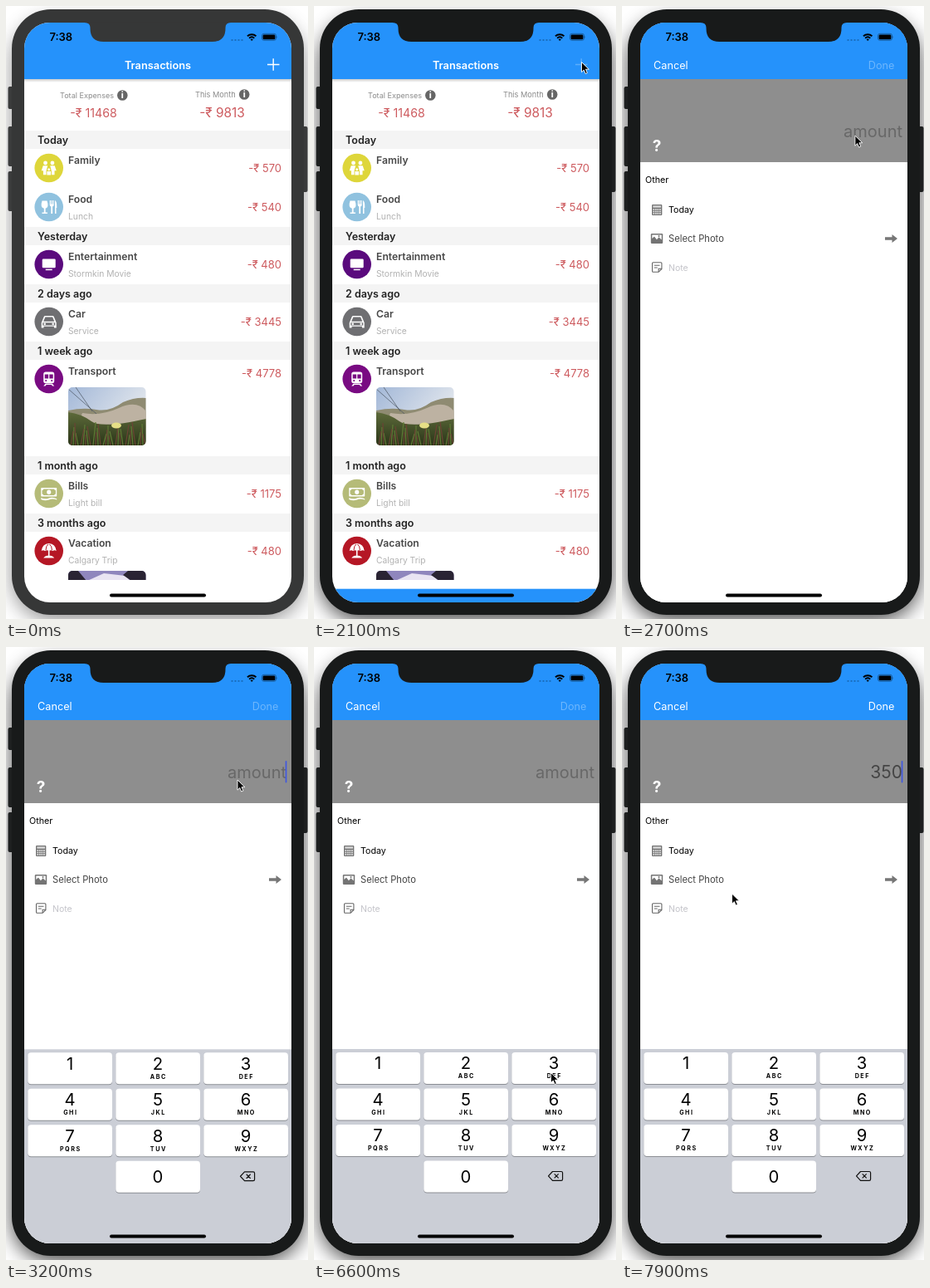
These frames come from a looping animation (364x738 px, 8 s). An HTML page:

```html
<!DOCTYPE html>
<html lang="en">
<head>
<meta charset="utf-8">
<title>Expense tracker</title>
<style>
  html, body { margin: 0; width: 100%; height: 100%; overflow: hidden; background: #fff; }
  svg { display: block; width: 364px; height: 738px; }
  text { font-family: Inter, Roboto, "Liberation Sans", sans-serif; }
</style>
</head>
<body>
<svg id="stage" viewBox="0 0 364 738" xmlns="http://www.w3.org/2000/svg">
  <defs>
    <clipPath id="screen"><rect x="22" y="20" width="322" height="698" rx="31"/></clipPath>
    <clipPath id="list"><rect x="22" y="88" width="322" height="603"/></clipPath>
    <clipPath id="dunes"><rect x="75" y="459" width="93.500" height="70" rx="5"/></clipPath>
    <clipPath id="dusk"><rect x="75" y="680" width="93.500" height="70" rx="5"/></clipPath>
    <filter id="soft" x="-30%" y="-30%" width="160%" height="160%"><feGaussianBlur stdDeviation="12"/></filter>
    <linearGradient id="sky" x2="1" y2=".6">
      <stop offset="0" stop-color="#a3b8d8"/><stop offset="1" stop-color="#eceef0"/>
    </linearGradient>
    <linearGradient id="grass" x2="0" y2="1">
      <stop offset="0" stop-color="#5d6a3a"/><stop offset="1" stop-color="#2a3518"/>
    </linearGradient>
    <linearGradient id="navShade" x2="0" y2="1">
      <stop offset="0" stop-color="#000" stop-opacity=".2"/><stop offset="1" stop-color="#000" stop-opacity="0"/>
    </linearGradient>
  </defs>

  <rect id="shadow" x="7" y="16" width="352" height="724" rx="50" filter="url(#soft)"/>
  <g id="buttons">
    <rect x="2.500" y="97" width="8" height="27" rx="2"/>
    <rect x="2.500" y="145" width="8" height="48" rx="2"/>
    <rect x="2.500" y="199" width="8" height="48" rx="2"/>
    <rect x="355.500" y="145" width="8" height="79" rx="2"/>
  </g>
  <rect id="body" x="7" y="4" width="352" height="729" rx="47"/>

  <g clip-path="url(#screen)">
    <rect x="22" y="20" width="322" height="698" fill="#fff"/>
    <g id="home" clip-path="url(#list)"></g>
    <rect x="22" y="20" width="322" height="68" fill="#2592fb"/>
    <rect x="22" y="88" width="322" height="4" fill="url(#navShade)"/>
    <g id="homeNav"><path id="plus" d="M315 70.500h14.500M322.200 63.300v14.500" stroke="#fff" stroke-width="1.400"/></g>
    <g id="modal"></g>
    <g id="keyboard"></g>
    <g id="status">
      <path d="M290.300 35.600a8.600 8.600 0 0 1 11.800 0l-1.300 1.500a6.600 6.600 0 0 0-9.200 0zM292.500 38a5.600 5.600 0 0 1 7.400 0l-1.300 1.400a3.600 3.600 0 0 0-4.800 0zM294.600 40.200a2.600 2.600 0 0 1 3.200 0l-1.600 1.800z"/>
      <rect x="308.500" y="33.300" width="17" height="8" rx="2.300" fill="none" stroke="#000" stroke-opacity=".45" stroke-width=".8"/>
      <rect x="309.600" y="34.400" width="14.800" height="5.800" rx="1.300"/>
      <path d="M326.500 36v2.800q1.300-1.400 0-2.800" opacity=".5"/>
      <path d="M271.500 41h14" stroke="#12508f" stroke-width="1.800" stroke-dasharray="2 2" opacity=".55"/>
    </g>
    <rect x="125" y="707.500" width="116" height="4" rx="2" fill="#000"/>
  </g>
  <path id="notch" d="M94 19.500h177v.5q-6.500 0-6.500 6v1q0 16-16 16h-131q-16 0-16-16v-1q0-6-7-6z"/>
  <path id="cursor" d="M0 0v12.200l2.800-2.700 1.900 4.500 2.200-.9-1.900-4.400h3.900z" fill="#000" stroke="#fff" stroke-width=".9"/>
</svg>
<script>
const LOOP = 8000;
const $ = id => document.getElementById(id);
const RED = '#cd5a5e';
const BLUE = '#2592fb';

function add(parent, tag, attrs, content) {
  const el = document.createElementNS('http://www.w3.org/2000/svg', tag);
  for (const k in attrs) el.setAttribute(k, attrs[k]);
  if (content !== undefined) el.textContent = content;
  parent.appendChild(el);
  return el;
}
function text(parent, str, x, y, size, fill, weight = 400, anchor = 'start') {
  return add(parent, 'text', {x, y, fill, 'font-size': size, 'font-weight': weight, 'text-anchor': anchor}, str);
}
const rect = (parent, x, y, width, height, fill, rx = 0) =>
  add(parent, 'rect', {x, y, width, height, fill, rx});
const path = (parent, d, attrs) => add(parent, 'path', {d, ...attrs});

// Category glyphs, centred on 0,0; "bg" marks parts cut out of the white shape.
const glyphs = {
  family: g => {
    for (const s of [-1, 1]) {
      add(g, 'circle', {cx: s * 4.2, cy: -6, r: 2.400});
      path(g, `M${s * 1.500} -2.800h${s * 5.5}l${s * 2} 6h${s * -2.200}v5h${s * -3.600}v-4.500z`);
    }
    add(g, 'circle', {cx: 0, cy: 1.500, r: 2.200, class: 'bg'});
    add(g, 'circle', {cx: 0, cy: 1.700, r: 1.500});
    path(g, 'M-2.300 4h4.600v4.500h-4.600z');
  },
  food: g => {
    path(g, 'M-8.200-7.500h6q2.700 8-1.900 9.300v4.700h2.300v1.500h-6.400v-1.500h2.300v-4.700q-5-1.300-2.300-9.300z');
    path(g, 'M1-8h1.200v4.500h.8v-4.500h1.100v4.500h.8v-4.500h1.100v5.500q0 1.600-1.600 2v8.500h-1.800v-8.500q-1.600-.4-1.600-2zM7.300 8v-16q2.500 1 2.300 9h-.8v7z');
  },
  screen: g => {
    rect(g, -8, -6.500, 16, 10.800, '#fff', 1.200);
    rect(g, -4, 5.700, 8, 1.500, '#fff');
  },
  car: g => {
    path(g, 'M-9 1.200l3-7.200q.4-1 1.500-1h9q1.100 0 1.500 1l3 7.200v6.300h-2.800v-1.700h-12.400v1.700h-2.800z');
    path(g, 'M-6.600 -.2l2.200-5.300h8.800l2.200 5.300zM-7.500 1.200h15v3.300h-15z', {class: 'bg'});
    for (const s of [-5, 5]) add(g, 'circle', {cx: s, cy: 2.800, r: 1.300});
  },
  train: g => {
    rect(g, -6.500, -8.500, 13, 13.500, '#fff', 2.600);
    for (const x of [-5, .6]) rect(g, x, -5.500, 4.400, 5, '').setAttribute('class', 'bg');
    for (const s of [-3.500, 3.500]) add(g, 'circle', {cx: s, cy: 2, r: 1.100, class: 'bg'});
    path(g, 'M-4 5.500l-2.500 3h2.200l1.300-1.500h6l1.300 1.500h2.200l-2.500-3z');
  },
  bills: g => {
    rect(g, -9.500, -7, 19, 10.500, '#fff', .8);
    path(g, 'M-6.500-5.500h13q0 1.600 1.700 1.600v4.300q-1.700 0-1.700 1.600h-13q0-1.600-1.700-1.600v-4.300q1.700 0 1.700-1.600z', {class: 'bg'});
    add(g, 'ellipse', {cx: 0, cy: -1.700, rx: 2.500, ry: 2.700});
    path(g, 'M-9.500 5.200q5 2 9.500.2t9.500.8v1.400q-5-2-9.500-.2t-9.500-.4z');
  },
  beach: g => {
    path(g, 'M-9 0q1-8.500 9-9 8 .5 9 9-2.200-1.700-4.200 0-2.300-1.700-4.800 0-2.500-1.700-4.800 0-2-1.700-4.200 0z');
    path(g, 'M-3.700-1q0-5 3-7M3.700-1q0-5-3-7', {class: 'line'});
    path(g, 'M-.8-.5h1.600v6.700h-1.600zM-6.500 8.500q2-3 6.500-3t6.500 3z');
  }
};

function badge(parent, cy, color, glyph) {
  add(parent, 'circle', {cx: 51.700, cy, r: 17.300, fill: color});
  const g = add(parent, 'g', {transform: `translate(51.700 ${cy})`, fill: '#fff'});
  glyphs[glyph](g);
  g.querySelectorAll('.bg').forEach(el => el.setAttribute('fill', color));
  g.querySelectorAll('.line').forEach(el => {
    el.setAttribute('fill', 'none');
    el.setAttribute('stroke', color);
  });
}

function buildHome() {
  const g = $('home');
  const info = (x, y) => {
    add(g, 'circle', {cx: x, cy: y, r: 6.300, fill: '#666'});
    text(g, 'i', x, y + 3.700, 10.500, '#fff', 800, 'middle');
  };
  text(g, 'Total Expenses', 65, 111, 9.100, '#8b8b8b');
  info(140.300, 107.500);
  text(g, '-₹ 11468', 105.500, 134.300, 14.200, RED, 400, 'middle');
  text(g, 'This Month', 228, 110, 9.200, '#8b8b8b');
  info(287.200, 106.500);
  text(g, '-₹ 9813', 260.500, 134.300, 15.400, RED, 400, 'middle');

  [['Today', 150], ['Yesterday', 266], ['2 days ago', 335], ['1 week ago', 404],
   ['1 month ago', 542], ['3 months ago', 611]].forEach(([name, y]) => {
    rect(g, 22, y, 322, 22, '#f4f4f4');
    text(g, name, 38, y + 16, 12.500, '#222', 600);
  });

  [[195, 'Family', '', 570, '#ded63a', 'family'],
   [242, 'Food', 'Lunch', 540, '#90c2df', 'food'],
   [311, 'Entertainment', 'Stormkin Movie', 480, '#5a0a7d', 'screen'],
   [380, 'Car', 'Service', 3445, '#6f6f72', 'car'],
   [449, 'Transport', '', 4778, '#790b82', 'train'],
   [587, 'Bills', 'Light bill', 1175, '#b5bb78', 'bills'],
   [656, 'Vacation', 'Calgary Trip', 480, '#b51725', 'beach']
  ].forEach(([cy, name, note, sum, color, glyph]) => {
    badge(g, cy, color, glyph);
    text(g, name, 75, cy - 5, 12.200, '#474747', 600);
    text(g, note, 75, cy + 15, 10.300, '#b2b2b2');
    text(g, '-₹ ' + sum, 332, cy + (name === 'Transport' ? -2 : 5), 13, RED, 400, 'end');
  });

  const dunes = add(g, 'g', {'clip-path': 'url(#dunes)'});
  rect(dunes, 75, 459, 94, 70, 'url(#sky)');
  path(dunes, 'M75 487q18-4 34-1t32-9q14-6 28-5v57h-94z', {fill: '#8f8b72'});
  path(dunes, 'M92 490q22 4 44-6t33 4v20h-84z', {fill: '#bdb2a2'});
  path(dunes, 'M75 489q16 2 28 11t66-3v32h-94z', {fill: 'url(#grass)'});
  const blades = color => (first => {
    let d = '';
    for (let i = first; i < 32; i += 2) d += `M${75 + i * 3} 529l${(i * 7) % 9 - 4} ${-12 - (i * 5) % 17}`;
    path(dunes, d, {stroke: color, 'stroke-width': 1.200});
  });
  blades('#5f7a35')(0);
  blades('#6b4334')(1);
  path(dunes, 'M75 461l34 30M84 459l20 29', {stroke: '#4b5360', 'stroke-width': .7});
  add(dunes, 'ellipse', {cx: 133, cy: 505, rx: 6, ry: 3.500, fill: '#e6df86'});

  const dusk = add(g, 'g', {'clip-path': 'url(#dusk)'});
  rect(dusk, 75, 680, 94, 70, '#8f86bd');
  path(dusk, 'M98 692l20-9 26 3 6 6z', {fill: '#e9e4f2'});
  path(dusk, 'M75 680h12l10 12h-22zM169 680h-22l-6 5 10 7h18z', {fill: '#2a2433'});

  text($('homeNav'), 'Transactions', 183, 75.700, 12.800, '#fff', 600, 'middle');
  text($('status'), '7:38', 66.300, 42, 13, '#000', 600, 'middle');
}

function buildModal() {
  const g = $('modal'), GREY = '#747474';
  rect(g, 22, 20, 322, 68, BLUE);
  rect(g, 22, 88, 322, 640, '#fff');
  rect(g, 22, 88, 322, 100, '#8e8e8e');
  text(g, 'Cancel', 38, 75.700, 12.700, '#fff');
  ui.done = text(g, 'Done', 328.500, 75.700, 12.700, '#fff', 400, 'end');
  text(g, '?', 42, 175, 19, '#fff', 700, 'middle');
  ui.amount = text(g, '', 338, 158.300, 20, '#666', 400, 'end');
  ui.caret = rect(g, 336.700, 137, 1.700, 26.500, '#4058e0', .8);
  text(g, 'Other', 28, 213, 10.700, '#000');
  text(g, 'Today', 56, 249, 10.700, '#000');
  text(g, 'Select Photo', 56, 284, 11.200, '#444');
  text(g, 'Note', 56, 319, 10.500, '#c4c4ca');

  rect(g, 36, 239, 12.300, 13, GREY, 1);
  rect(g, 37.300, 240.300, 9.700, 2.400, '#d8d8d8');
  for (let i = 0; i < 12; i++) rect(g, 37.300 + i % 4 * 2.550, 244.200 + Math.floor(i / 4) * 2.500, 1.900, 1.600, '#e4e4e4');

  rect(g, 34.800, 274, 14.400, 12, GREY, 1.200);
  path(g, 'M36.300 275.500h11.400v6l-3.200-3.300-2.600 3-3-3.600-2.600 2.500z', {fill: '#fff'});
  add(g, 'circle', {cx: 44.500, cy: 277, r: 1, fill: GREY});

  path(g, 'M37.500 308.700h9.400q1 0 1 1v6.800l-3.800 3.800h-6.600q-1 0-1-1v-9.600q0-1 1-1zM47.900 316.300h-3.800v4M38.900 312.300h6.600M38.900 315h3.800',
    {fill: 'none', stroke: '#666', 'stroke-width': 1.100});
  path(g, 'M317 278.300h8.500v-3.300l6.500 5-6.500 5v-3.300h-8.500z', {fill: '#777'});
}

function buildKeyboard() {
  const g = $('keyboard');
  rect(g, 22, 484, 322, 240, '#cbced6');
  const letters = ['', 'ABC', 'DEF', 'GHI', 'JKL', 'MNO', 'PQRS', 'TUV', 'WXYZ'];
  for (let n = 0; n < 10; n++) {
    const i = n ? n - 1 : 10;
    const x = 26.300 + i % 3 * 106, y = 488 + Math.floor(i / 3) * 43.500;
    rect(g, x, y + 1, 101.700, 38, '#8b8e94', 4);
    ui.keys[n] = rect(g, x, y, 101.700, 38, '#fff', 4);
    text(g, n, x + 50.700, y + (n ? 20.300 : 26), 20.300, '#000', 400, 'middle');
    if (n > 1) text(g, letters[i], x + 51.500, y + 31.300, 7.200, '#000', 700, 'middle').setAttribute('letter-spacing', 1.500);
  }
  path(g, 'M287.500 631.500h10.500q1.600 0 1.600 1.600v7.600q0 1.600-1.600 1.600h-10.500l-5-5.400zM289.700 634.400l5 5M294.700 634.400l-5 5',
    {fill: 'none', stroke: '#111', 'stroke-width': 1.200, 'stroke-linejoin': 'round'});
}

const ui = {keys: []};
buildHome();
buildModal();
buildKeyboard();

// Pointer stops: time, x, y
const stops = [
  [700, 362, 506], [1500, 322.500, 67.500], [2380, 322.500, 67.500], [2750, 279, 160],
  [4000, 279, 160], [4750, 186.500, 315], [5600, 186.500, 315], [6500, 285.500, 512.500],
  [6850, 285.500, 512.500], [7130, 186, 552], [7280, 186, 552], [7520, 185, 638],
  [7660, 185, 638], [7880, 132.500, 297]
];
// Key taps: time, digit
const taps = [[6770, 3], [7180, 5], [7570, 0]];

const clamp = v => Math.max(0, Math.min(1, v));
// Critically damped spring: 1 at the start, settling to 0
function settle(ms, rate) {
  const u = Math.max(0, ms) / 1000 * rate;
  return u > 9 ? 0 : (1 + u) * Math.exp(-u);
}

function pointer(t) {
  const i = stops.findLastIndex(s => s[0] <= t);
  const a = stops[i], b = stops[i + 1] || a;
  const k = b === a ? 0 : (1 - Math.cos(Math.PI * (t - a[0]) / (b[0] - a[0]))) / 2;
  return [a[1] + (b[1] - a[1]) * k, a[2] + (b[2] - a[2]) * k];
}

function caretOpacity(t) {
  if (t < 2880) return 0;
  if (t < 3650 || t >= taps[0][0]) return 1;
  const p = (t - 3650) % 900;
  return p < 450 ? clamp(1 - p / 130) : clamp((p - 450) / 130);
}

const set = (el, k, v) => el.setAttribute(k, v);
const show = (el, on) => set(el, 'visibility', on ? 'visible' : 'hidden');

function draw(t) {
  const active = t >= 1900;
  const shell = active ? '#181a1a' : '#363737';
  set($('body'), 'fill', shell);
  set($('notch'), 'fill', shell);
  set($('buttons'), 'fill', active ? '#1d1f1f' : '#3a3b3b');
  set($('shadow'), 'opacity', active ? .7 : .42);
  set($('plus'), 'opacity', active ? .25 : 1);

  show($('modal'), t >= 2082);
  set($('modal'), 'transform', `translate(0 ${(716 * settle(t - 2082, 18.260)).toFixed(2)})`);

  show($('keyboard'), t >= 2780);
  set($('keyboard'), 'transform', `translate(0 ${(236 * settle(t - 2780, 21)).toFixed(2)})`);

  const typed = taps.filter(k => t >= k[0]).map(k => k[1]).join('');
  const label = typed || 'amount';
  if (ui.amount.textContent !== label) ui.amount.textContent = label;
  set(ui.amount, 'fill', typed ? '#454545' : '#686868');
  set(ui.amount, 'font-size', typed ? 21 : 20);
  set(ui.done, 'opacity', typed ? 1 : .33);
  set(ui.caret, 'opacity', caretOpacity(t));
  ui.keys.forEach(k => set(k, 'fill', '#fff'));
  for (const [at, n] of taps) if (t >= at - 20 && t < at + 90) set(ui.keys[n], 'fill', '#b0b5c0');

  show($('cursor'), t >= stops[0][0]);
  if (t >= stops[0][0]) set($('cursor'), 'transform', `translate(${pointer(t).map(v => v.toFixed(2)).join(' ')})`);
}

const start = performance.now();
function tick() {
  draw((performance.now() - start) % LOOP);
  requestAnimationFrame(tick);
}
draw(0);
requestAnimationFrame(tick);
</script>
</body>
</html>
```
